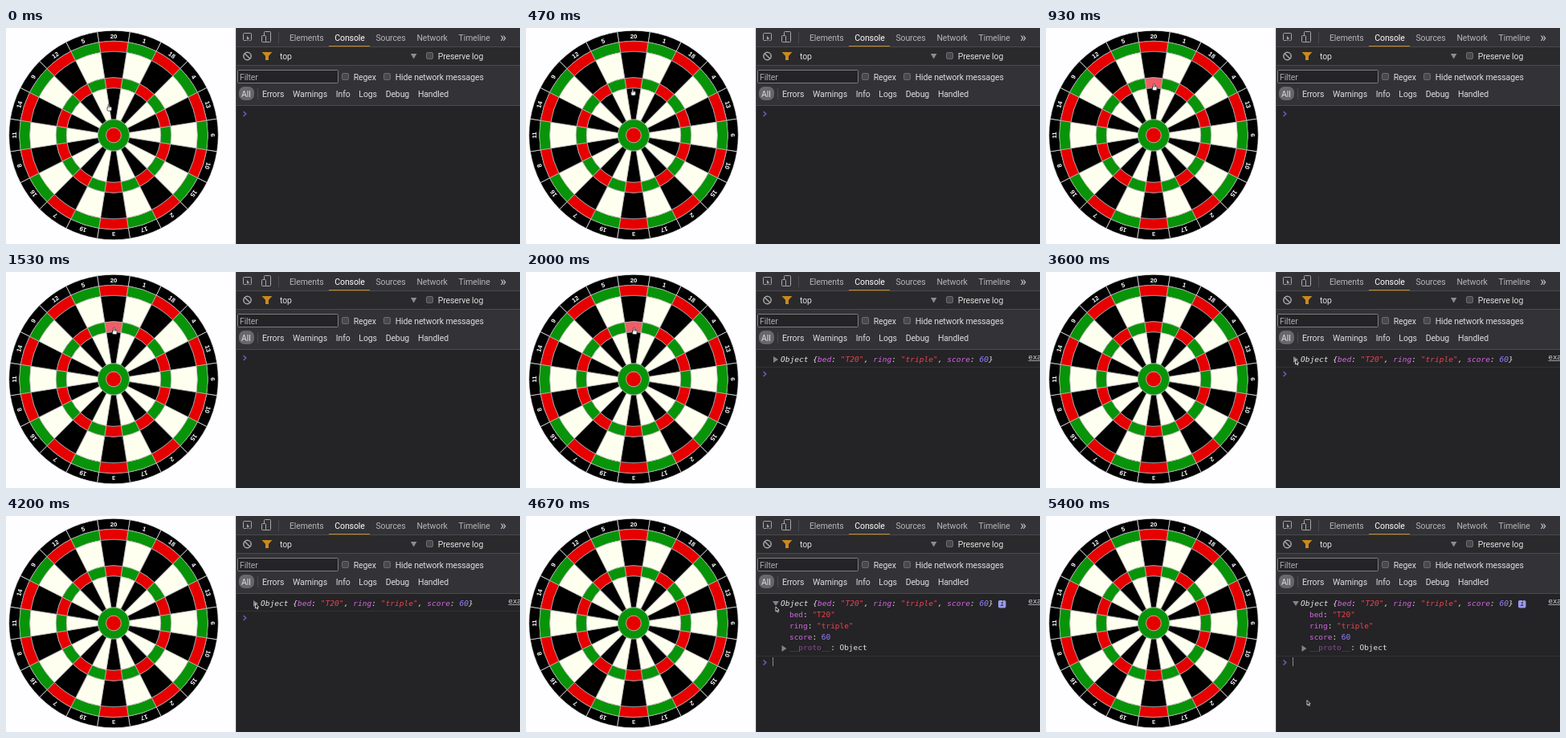
An HTML page with a canvas for the animation above (5.47 s loop, 640 by 269 pixels).

```html
<!DOCTYPE html>
<html lang="en">
<head>
<meta charset="utf-8">
<style>
html, body { margin: 0; width: 100%; height: 100%; overflow: hidden; background: #fefdff; }
canvas { display: block; }
</style>
</head>
<body>
<canvas id="stage" width="640" height="269"></canvas>
<script>
const ctx = document.getElementById('stage').getContext('2d');
const LOOP = 5470, LOGGED = 1600, EXPANDED = 4337;
const CX = 134, CY = 133.5, RING = 13.03, SLICE = Math.PI / 10;
const SANS = '10.5px Roboto, sans-serif';
const MONO = '9.45px "DejaVu Sans Mono", monospace';
const ITALIC = 'italic 9.57px "DejaVu Sans Mono", monospace';
const RED = '#e60000', GREEN = '#089408', IVORY = '#fffff0', WIRE = '#b4b4b4';
const PANEL = '#242326', BAR = '#333236', RULE = '#4a494d', ICON = '#a9a9ab';
const PLAIN = '#e6e6e6', KEY = '#d566e4', STRING = '#ec444e', NUMBER = '#9980ff';
const NUMBERS = '20 1 18 4 13 6 10 15 2 17 3 19 7 16 8 11 14 9 12 5'.split(' ');
const RESULT = { bed: ['"T20"', STRING], ring: ['"triple"', STRING], score: ['60', NUMBER] };

// Pointer: resting place, then moves as start, end, x, y
const HOME = [128, 95];
const MOVES = [
  [100, 650, 134.5, 69.5], [2150, 2650, 319.5, 143],
  [2800, 3350, 310.5, 109], [4600, 5250, 325, 229.5]
];

function rect(x, y, w, h, color) {
  ctx.fillStyle = color;
  ctx.fillRect(x, y, w, h);
}

function paint(fill, stroke) {
  if (fill) { ctx.fillStyle = fill; ctx.fill(); }
  if (stroke) { ctx.strokeStyle = stroke; ctx.stroke(); }
}

function box(x, y, w, h, radius, fill, stroke) {
  ctx.beginPath();
  ctx.roundRect(x, y, w, h, radius);
  paint(fill, stroke);
}

function disc(x, y, radius, fill, stroke) {
  ctx.beginPath();
  ctx.arc(x, y, radius, 0, 2 * Math.PI);
  paint(fill, stroke);
}

function poly(fill, stroke, ...points) {
  ctx.beginPath();
  points.forEach(([x, y]) => ctx.lineTo(x, y));
  if (fill) ctx.closePath();
  paint(fill, stroke);
}

function triangleDown(x, y, w, h, fill) {
  poly(fill, null, [x - w / 2, y - h / 2], [x + w / 2, y - h / 2], [x, y + h / 2]);
}

function triangleRight(x, y) {
  poly('#848387', null, [x - 3, y - 4], [x + 3, y], [x - 3, y + 4]);
}

// Draws text and returns the x where it ends
function label(text, x, y, color = '#dedede', font = SANS) {
  ctx.font = font;
  ctx.letterSpacing = font === SANS ? '-0.12px' : '0px';
  ctx.fillStyle = color;
  ctx.fillText(text, x, y);
  return x + ctx.measureText(text).width;
}

function row(words, x, y, gap, color) {
  for (const word of words.split(' '))
    x = label(word, x, y, word === 'Console' ? '#fff' : color) + gap;
}

function line(x, y, font, ...parts) {
  for (const [text, color] of parts) x = label(text, x, y, color, font);
}

function cell(inner, outer, fill, stroke) {
  const from = -Math.PI / 2 - SLICE / 2, to = from + SLICE;
  ctx.beginPath();
  ctx.arc(0, 0, outer * RING, from, to);
  ctx.arc(0, 0, inner * RING, to, from, true);
  ctx.closePath();
  paint(fill, stroke);
}

function drawBoard(hoverTriple) {
  ctx.save();
  ctx.translate(CX, CY);
  ctx.lineWidth = 0.7;
  ctx.textAlign = 'center';
  NUMBERS.forEach((number, i) => {
    const [ring, bed] = i % 2 ? [GREEN, IVORY] : [RED, '#000'];
    cell(9, 10, '#000', '#e8e8e8');
    cell(8, 9, ring, WIRE);
    cell(5.5, 8, bed, WIRE);
    cell(4.5, 5.5, i === 0 && hoverTriple ? '#ef5d66' : ring, WIRE);
    cell(1.5, 4.5, bed, WIRE);
    label(number, 0, -122.8, '#fff', 'bold 7.8px "Liberation Sans", sans-serif');
    ctx.rotate(SLICE);
  });
  disc(0, 0, 1.5 * RING, GREEN, WIRE);
  disc(0, 0, 0.72 * RING, RED, '#d8d8d8');
  ctx.restore();
}

function checkbox(text, x, y) {
  box(x + 0.5, y - 4.5, 8, 8, 1.5, '#49484b', '#6c6b6f');
  label(text, x + 14.7, y + 0.8);
}

function drawToolbars() {
  rect(286, 0, 354, 269, PANEL);
  rect(286, 0, 354, 96, BAR);
  rect(286, 24, 354, 22, '#2a292c');
  rect(286, 0, 1, 269, '#504f53');
  for (const y of [23, 46, 96]) rect(287, y, 353, 1, RULE);
  ctx.lineWidth = 1;

  // Tabs
  box(295.5, 6.5, 10, 9, 1, null, ICON);
  arrow(299.5, 9, 1.1, ICON, BAR);
  box(321.5, 4.5, 8, 13, 1, null, ICON);
  box(318.5, 9.5, 5, 8, 1, BAR, ICON);
  rect(339, 5, 1, 14, RULE);
  row('Elements Console Sources Network Timeline', 353, 12.8, 13.8, '#b5b5b7');
  label('»', 615, 11.8, '#c8c8ca', '17px Roboto, sans-serif');
  rect(402, 22, 51, 1, '#c98a1e');

  // Clear, filter and context
  ctx.lineWidth = 1.5;
  disc(300.5, 35, 4.7, null, ICON);
  poly(null, ICON, [297.2, 31.7], [303.8, 38.3]);
  ctx.lineWidth = 1;
  triangleDown(325, 33.5, 13, 7, '#c98a1e');
  rect(323, 34, 4, 6, '#c98a1e');
  triangleDown(507.7, 35.2, 7.5, 6.5, '#8d8d90');
  label('top', 341, 35.8);
  checkbox('Preserve log', 523, 35);

  box(288.5, 52.5, 125, 16, 1, PANEL, '#7c7b7f');
  label('Filter', 291, 61.8, '#a9a9ab');
  checkbox('Regex', 418, 61);
  checkbox('Hide network messages', 470, 61);

  box(290, 73, 19, 17, 7, '#68676b');
  label('All', 293, 82.8);
  rect(313, 75, 1, 14, RULE);
  row('Errors Warnings Info Logs Debug Handled', 319, 82.8, 10.8);
}

function prompt(y) {
  ctx.lineWidth = 1.6;
  poly(null, '#5d62b5', [295.5, y - 3], [298.8, y], [295.5, y + 3]);
}

function drawConsole(t) {
  if (t < LOGGED) return prompt(107);
  const open = t >= EXPANDED, fields = Object.entries(RESULT);
  const preview = fields.flatMap(([name, value], i) =>
    [[i ? ', ' : '', PLAIN], [name, KEY], [': ', PLAIN], value]);
  line(317, 110, ITALIC, ['Object {', PLAIN], ...preview, ['}', PLAIN]);
  label('exam', 625.5, 107, '#d0d0d2', '9px "DejaVu Sans Mono", monospace');
  rect(625.5, 110, 15, 1, '#a0a0a2');

  if (open) {
    triangleDown(311, 109, 8, 6, '#848387');
    fields.forEach(([name, value], i) =>
      line(328, 124 + 13.7 * i, MONO, [name, KEY], [': ', PLAIN], value));
    triangleRight(321.5, 165);
    line(328, 165, MONO, ['__proto__', '#8d4b98'], [': Object', PLAIN]);
    box(588, 105, 9.5, 9.5, 2, '#9c9bea');
    label('i', 590, 110, PANEL, ITALIC);
    if ((t - EXPANDED) % 1000 < 500) rect(307, 176, 1, 11, '#8a8a8d');
  } else {
    triangleRight(311, 109);
  }
  rect(287, open ? 174 : 118, 353, 1, '#323135');
  prompt(open ? 182.5 : 127);
}

function pointerAt(t) {
  let [x, y] = HOME;
  for (const [start, end, toX, toY] of MOVES) {
    const u = Math.min(1, Math.max(0, (t - start) / (end - start)));
    const ease = u * u * (3 - 2 * u);
    x += (toX - x) * ease;
    y += (toY - y) * ease;
  }
  return [x, y];
}

function arrow(x, y, size, fill, edge) {
  ctx.save();
  ctx.translate(x, y);
  ctx.scale(size, size);
  ctx.lineWidth = 0.8;
  poly(fill, edge, [0, 0], [0, 6], [1.4, 4.8], [2.4, 7], [3.4, 6.5], [2.4, 4.4], [4.2, 4.3]);
  ctx.restore();
}

function hand(x, y) {
  ctx.lineWidth = 0.8;
  box(x - 2, y + 3, 5.6, 5.2, 1.5, '#fff', '#222');
  box(x - 0.8, y, 1.6, 5, 0.8, '#fff', '#222');
  rect(x - 0.5, y + 3, 1, 3, '#fff');
}

function draw(now) {
  const t = now % LOOP;
  const [x, y] = pointerAt(t);
  const dx = x - CX, dy = y - CY, rings = Math.hypot(dx, dy) / RING;
  const hoverTriple = rings > 4.5 && rings < 5.5 && Math.abs(Math.atan2(dx, -dy)) < SLICE / 2;
  ctx.textBaseline = 'middle';
  rect(0, 0, 640, 269, '#fefdff');
  drawBoard(hoverTriple);
  drawToolbars();
  drawConsole(t);
  if (rings < 9) hand(x, y);
  else arrow(x, y, 1, '#111', '#eee');
  requestAnimationFrame(draw);
}
requestAnimationFrame(draw);
</script>
</body>
</html>
```
